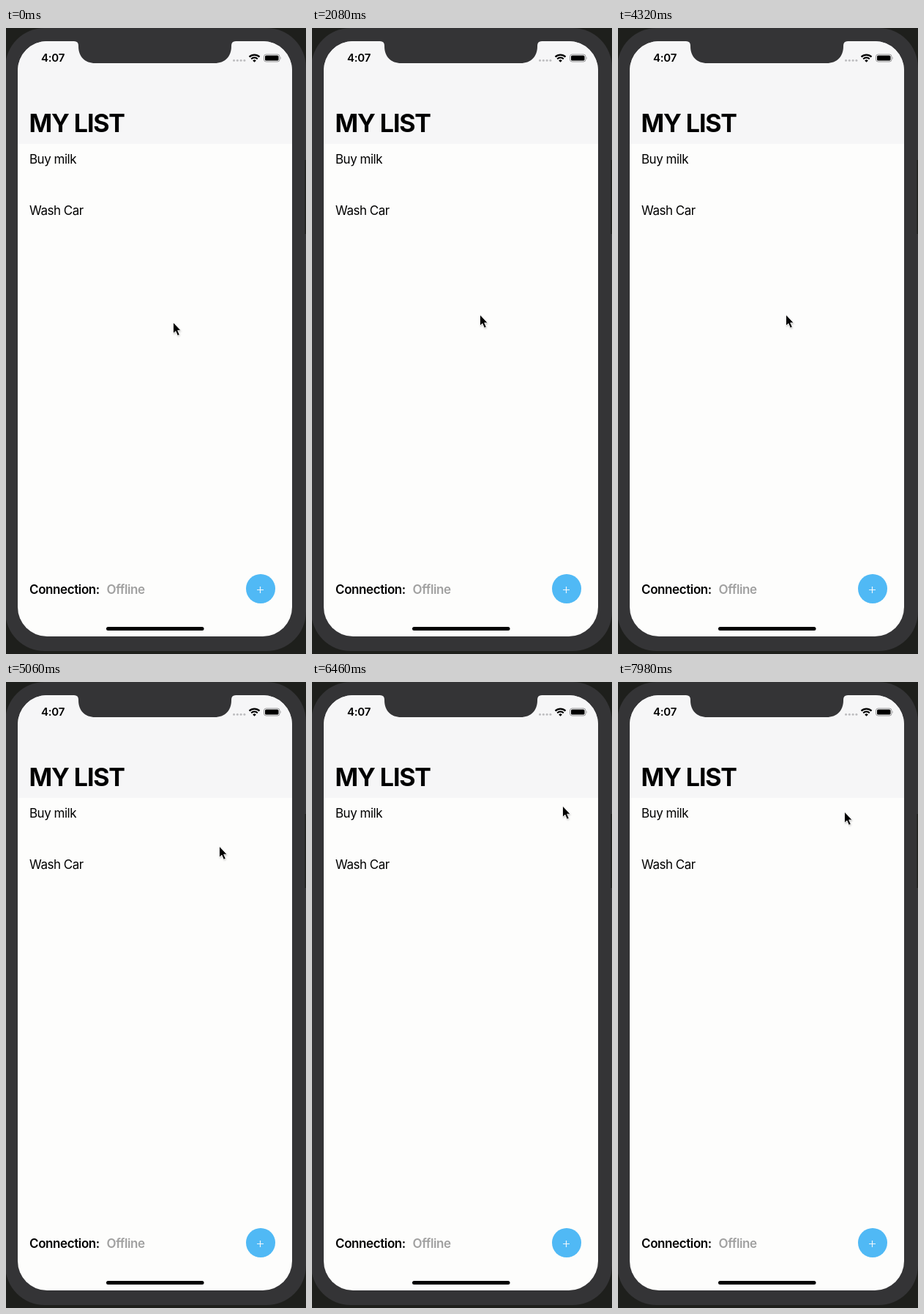
These frames come from a looping animation (410x854 px, 8 s). An HTML page:

```html
<!DOCTYPE html>
<html lang="en">
<head>
<meta charset="utf-8">
<title>My list</title>
<style>
  html, body { margin: 0; width: 100%; height: 100%; overflow: hidden; background: #1e1f1c; }
  svg { display: block; width: 100vw; height: 100vh; }
  text { font-family: Inter, "Liberation Sans", sans-serif; font-size: 17px; letter-spacing: -.5px; }
  .title { font-size: 34px; font-weight: 700; letter-spacing: -1.1px; }
  .clock { font-size: 15px; font-weight: 600; letter-spacing: -.2px; }
  .status { font-weight: 600; letter-spacing: -.4px; }
</style>
</head>
<body>
<svg viewBox="0 0 410 854">
  <defs>
    <clipPath id="screen"><rect x="16" y="18" width="375" height="812" rx="40"/></clipPath>
    <filter id="soft" x="-100%" y="-100%" width="300%" height="300%"><feGaussianBlur stdDeviation="1.3"/></filter>
  </defs>

  <rect width="410" height="854" fill="#1e1f1c"/>
  <rect x="-1" width="411" height="850" rx="54" fill="#343436"/>
  <rect x="408.5" y="180" width="1.5" height="101" fill="#1e1f1c"/>

  <g clip-path="url(#screen)">
    <rect x="16" y="18" width="375" height="812" fill="#fdfdfc"/>
    <rect x="16" y="18" width="375" height="140" fill="#f6f6f7"/>
  </g>
  <path fill="#343436" d="M93 17V18Q99 18 99 24V25C99 39 108 48 122 48H285C299 48 308 39 308 25V24Q308 18 314 18V17Z"/>

  <text class="clock" x="48" y="46">4:07</text>
  <g fill="#bdbdbf">
    <circle cx="311.5" cy="44.3" r="1.5"/><circle cx="316.3" cy="44.3" r="1.5"/>
    <circle cx="321.1" cy="44.3" r="1.5"/><circle cx="325.9" cy="44.3" r="1.5"/>
  </g>
  <g fill="none" stroke="#000" stroke-width="2.2">
    <path d="M332.5 39.4A10 10 0 0 1 346.5 39.4"/>
    <path d="M335.2 42.2A6.2 6.2 0 0 1 343.8 42.2"/>
  </g>
  <path d="M339.5 46.8L337.2 44.4A3.3 3.3 0 0 1 341.8 44.4Z"/>
  <rect x="352.5" y="36" width="21.5" height="10" rx="3" fill="none" stroke="#98989a"/>
  <rect x="354" y="37.5" width="18.5" height="7" rx="1.6"/>
  <path fill="#98989a" d="M375 39.3Q376.6 41 375 42.7Z"/>

  <text class="title" x="31.5" y="142">MY LIST</text>
  <text x="32" y="185">Buy milk</text>
  <text x="32" y="255">Wash Car</text>

  <text class="status" x="32" y="772">Connection:</text>
  <text class="status" x="137.5" y="772" fill="#a0a0a0">Offline</text>
  <circle cx="348" cy="765" r="20" fill="#50b9f5"/>
  <path d="M343 766.5H352M347.5 762V771" stroke="#eef6fb" stroke-width="1.2"/>
  <rect x="137" y="817" width="133.5" height="5" rx="2.5"/>

  <g id="cursor">
    <path d="M0 1V15.5L3.5 12.4L6 18.2L8.6 17L6.1 11.5H10.8Z" transform="translate(.6 1.2)" fill="#777" opacity=".5" filter="url(#soft)"/>
    <path d="M0 0V15.3L3.4 12.2L6 18.3L8.8 17L6.2 11.2H10.6Z" fill="#000" stroke="#fdfdfc" stroke-width=".9"/>
  </g>
</svg>
<script>
  const LOOP = 8000;
  const cursor = document.getElementById('cursor');

  // Cursor tip: [ms, x, y]
  const path = [
    [0, 228.5, 401.5],
    [900, 228.5, 401.5],
    [1100, 228.5, 400],
    [1700, 229.5, 391],
    [4400, 229.5, 391],
    [5060, 291.5, 224],
    [5700, 342.5, 169],
    [6800, 342.5, 169],
    [7700, 309.5, 177],
    [LOOP, 309.5, 177]
  ];

  const ease = u => u * u * (3 - 2 * u);

  function tipAt(t) {
    const i = path.findIndex(p => p[0] > t);
    const [t0, x0, y0] = path[i - 1];
    const [t1, x1, y1] = path[i];
    const k = ease((t - t0) / (t1 - t0));
    return [x0 + (x1 - x0) * k, y0 + (y1 - y0) * k];
  }

  function draw(t) {
    const [x, y] = tipAt(t);
    cursor.setAttribute('transform', `translate(${x.toFixed(2)} ${y.toFixed(2)})`);
  }

  const start = performance.now();
  function tick() {
    draw((performance.now() - start) % LOOP);
    requestAnimationFrame(tick);
  }
  tick();
</script>
</body>
</html>
```
